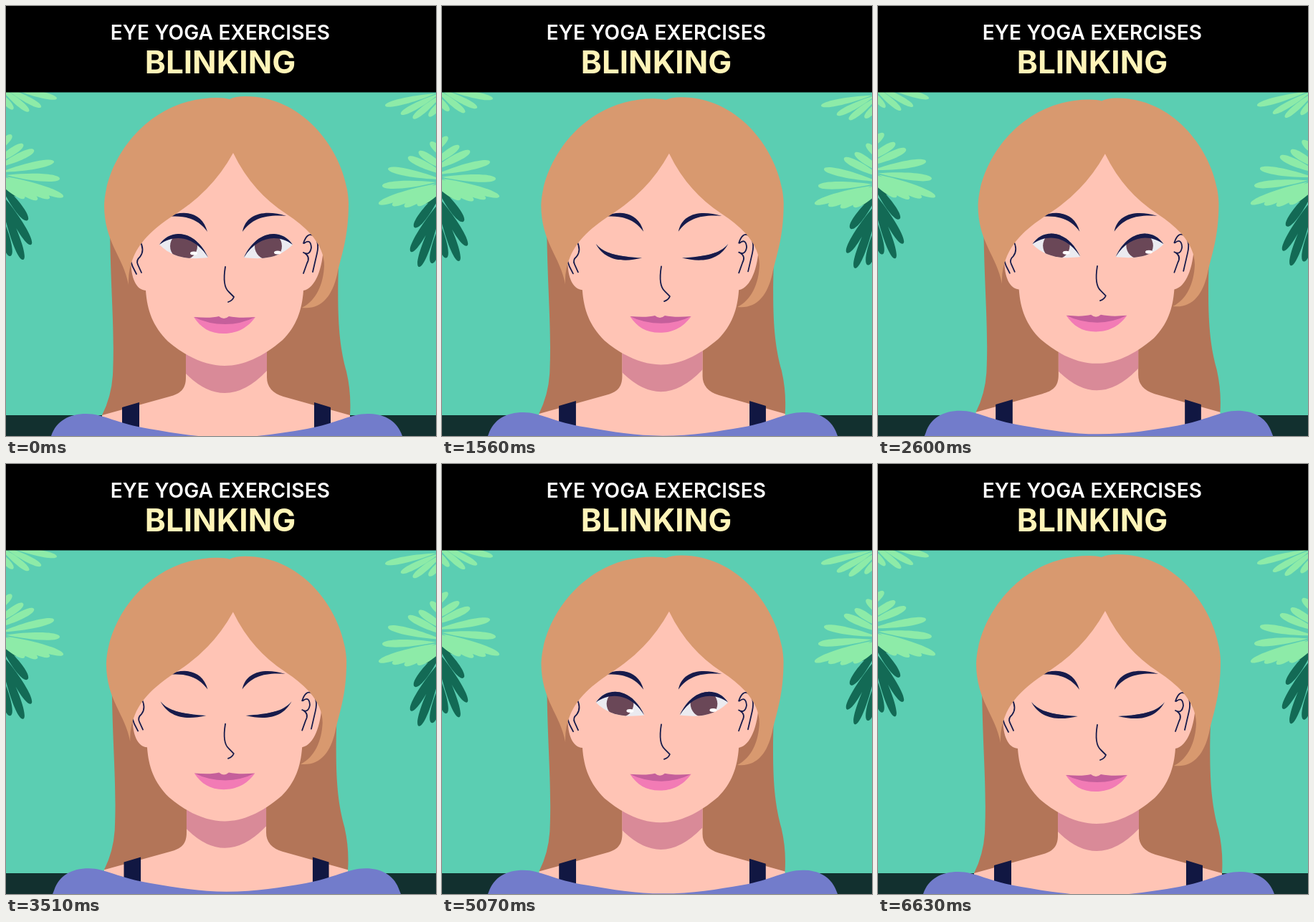
Recreate the animation shown at these times as an HTML page. Size 600x600 px, loop 6760 ms.

```html
<!DOCTYPE html>
<html lang="en">
<head>
<meta charset="utf-8">
<title>Blinking exercise</title>
<style>
  html, body { margin: 0; width: 100%; height: 100%; overflow: hidden; background: #000; }
  svg { display: block; width: 100vw; height: 100vh; }
  text { font-family: Inter, sans-serif; text-anchor: middle; }
  .skin { fill: #ffc4b5; }
  .navy { fill: #171b4b; }
  .line { fill: none; stroke: #171b4b; stroke-width: 1.8; stroke-linecap: round; stroke-linejoin: round; }
</style>
</head>
<body>
<svg viewBox="0 0 600 600">
  <defs>
    <clipPath id="opening"><path id="eyeShape"/></clipPath>
    <g id="eye">
      <g clip-path="url(#opening)">
        <rect x="205" y="300" width="85" height="65" fill="#ebebf0"/>
        <circle cx="248" cy="335" r="19" fill="#6a4757"/>
      </g>
      <path id="lash" class="navy"/>
    </g>
    <g id="palms"></g>
  </defs>

  <rect width="600" height="600" fill="#5bceb2"/>
  <rect y="571" width="600" height="29" fill="#12302f"/>
  <use href="#palms"/>
  <use href="#palms" transform="matrix(-1 0 0 1 600 10)"/>

  <g id="person">
    <path fill="#b37558" d="M145 310C146 400 152 450 149 515Q147 545 134 571H480Q482 540 475 510C464 470 461 430 465 330Z"/>
    <path class="skin" d="M251 470V518C251 535 243 541 228 545L134 571V615H480V571L387 545Q364 538 364 518V470Z"/>
    <path fill="#d98a98" d="M251 470V513Q307 569 364 509V470Z"/>
    <path fill="#111742" d="M162 560L186 553V615H162ZM430 553L453 560V615H430Z"/>
    <path fill="#727ccb" d="M57 615L63 600C70 579 88 569 112 569C136 569 155 583 200 590C235 596 270 602 308 602C350 602 385 596 420 590C460 583 480 569 505 569C528 569 546 579 553 600L559 615Z"/>

    <path class="skin" d="M317 200L180 320C169 355 174 396 195 397C197 425 205 447 226 468C252 490 279 502 305 502C331 502 358 490 386 466C405 447 413 425 415 397C432 394 442 365 443 335L420 305Z"/>
    <path class="line" d="M187 328Q194 341 187 350Q181 355 184 361L189 372M173 353Q176 364 182 374"/>
    <path class="line" d="M415 331Q420 316 428 320Q438 327 434 345Q431 358 428 371M416 331Q425 324 426 337Q424 349 415 344M417 345Q425 350 420 359L415 373"/>
    <path class="navy" d="M227 294C246 284 274 287 281 315C268 297 250 292 227 294ZM330 315C335 289 362 284 391 293C362 291 344 296 330 315Z"/>
    <path fill="#d8996f" d="M171 389C164 350 137 330 137 278C139 215 197 128 295 128Q305 128 312 130Q320 126 334 126C420 126 476 210 478 275C478 325 467 350 462 375C455 405 440 424 413 421C433 411 443 388 444 362Q444 340 425 318Q411 303 391 290Q343 259 317 205Q289 256 240 288C207 309 188 327 178 350Q170 368 171 389Z"/>

    <use href="#eye"/>
    <use href="#eye" transform="matrix(-1 0 0 1 614 0)"/>
    <g id="glints" fill="#fff">
      <ellipse cx="262" cy="345" rx="5" ry="2.5"/>
      <ellipse cx="379" cy="344" rx="5" ry="2.5"/>
    </g>

    <path class="line" d="M306 364C303 382 304 393 311 399L318 406Q316 411 310 413"/>
    <path fill="#f27bb5" d="M262 434Q285 442 306 442Q330 442 348 434C336 451 320 457 304 457C284 457 272 449 262 434Z"/>
    <path fill="#c55f9b" d="M262 434Q286 436 297 433Q304 439 311 433Q325 436 348 434Q328 444 306 444Q282 444 262 434Z"/>
  </g>

  <rect width="600" height="120.5"/>
  <text x="299" y="47" font-size="28" font-weight="600" letter-spacing=".2" fill="#fff">EYE YOGA EXERCISES</text>
  <text x="299" y="94" font-size="44" font-weight="700" fill="#fff4b8">BLINKING</text>
</svg>
<script>
const $ = id => document.getElementById(id);
const LOOP = 6760, STEP = 130, SWAY = 2080, BLINK = 2600;

// A club-shaped leaflet, narrow at the base and rounded at the tip.
function leaflet([x1, y1, x2, y2], width) {
  const length = Math.hypot(x2 - x1, y2 - y1);
  const nx = (y1 - y2) / length * width, ny = (x2 - x1) / length * width;
  const mx = (x1 + x2) / 2, my = (y1 + y2) / 2;
  return `M${x1} ${y1}C${mx + nx} ${my + ny} ${x2 + nx} ${y2 + ny} ${x2} ${y2}` +
    `C${x2 - nx} ${y2 - ny} ${mx - nx} ${my - ny} ${x1} ${y1}Z`;
}
const frond = (color, width, leaves) =>
  `<path fill="${color}" d="${leaves.map(l => leaflet(l, width)).join('')}"/>`;

$('palms').innerHTML =
  frond('#136a55', 8, [
    [-14, 238, 18, 264], [-10, 245, 30, 299], [-10, 258, 35, 333],
    [-8, 265, 24, 354], [-12, 280, 6, 349]
  ]) +
  frond('#8deba8', 7, [
    [-30, 215, 8, 180], [-20, 222, 24, 193], [-14, 226, 39, 201],
    [-8, 232, 67, 217], [0, 236, 75, 241], [0, 238, 80, 266],
    [-6, 238, 61, 268], [-12, 238, 44, 270], [-18, 238, 26, 268]
  ]) +
  frond('#8deba8', 6, [
    [0, 112, 71, 129], [-5, 112, 49, 141], [-10, 112, 32, 147], [-20, 112, 10, 144]
  ]);

// Lash outline: outer corner, upper edge to the inner corner, lower edge back.
const OPEN = [214, 333, 230, 308, 266, 314, 282, 351, 264, 322, 236, 317];
const CLOSED = [214, 332, 226, 347, 248, 350, 279, 352, 250, 359, 226, 355];

function drawEyes(open) {
  const p = CLOSED.map((c, i) => c + (OPEN[i] - c) * open);
  const upper = `M${p[0]} ${p[1]}C${p.slice(2, 8).join(' ')}`;
  $('lash').setAttribute('d', `${upper}C${p.slice(8).join(' ')} ${p[0]} ${p[1]}Z`);
  $('eyeShape').setAttribute('d', `${upper}C262 353 236 355 ${p[0]} ${p[1]}Z`);
  $('glints').setAttribute('opacity', open > .4 ? 1 : 0);
}

function draw(now) {
  const t = Math.floor(now % LOOP / STEP) * STEP;
  const wave = period => 2 * Math.PI * t / period;

  const scale = .9915 + .0085 * Math.cos(wave(LOOP));
  $('person').setAttribute('transform',
    `translate(308 290) scale(${scale}) translate(-308 -290)`);

  const angle = 1.9 * Math.sin(wave(SWAY));
  $('palms').setAttribute('transform', `translate(80 0) skewY(${angle}) translate(-80 0)`);

  const phase = t % BLINK, fromOpen = Math.min(phase, BLINK - phase);
  drawEyes(Math.max(0, Math.min(1, (520 - fromOpen) / 260)));
}

const start = performance.now();
(function tick() {
  draw(performance.now() - start);
  requestAnimationFrame(tick);
})();
</script>
</body>
</html>
```
